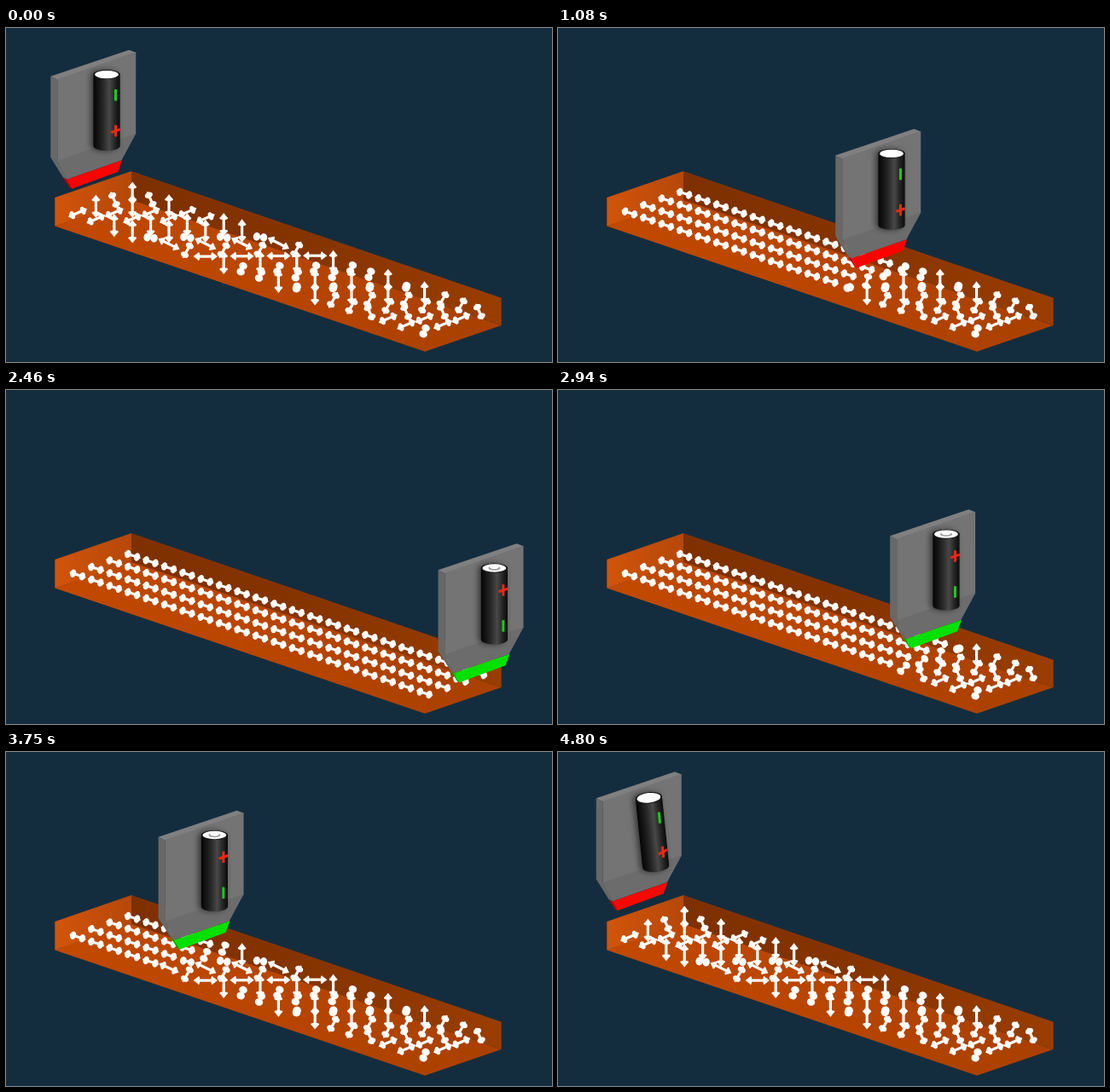
An HTML page with a canvas for the animation above (4830 ms loop, 640x392 px).

```html
<!DOCTYPE html>
<html lang="en">
<head>
<meta charset="utf-8">
<title>Magnetic head aligning dipoles</title>
<style>
html, body { margin: 0; width: 100%; height: 100%; overflow: hidden; background: #132d3f; }
canvas { display: block; }
</style>
</head>
<body>
<canvas id="stage" width="640" height="392"></canvas>
<script>
const ctx = document.getElementById('stage').getContext('2d');
const LOOP = 4830, STEP = 30, STEPS = 160;

// Half-vectors of the dipoles as seen on screen
const up = [0, -13], rise = [10.5, -4.5], fall = [12, 6], flat = [13.5, 0], steep = [5, -9],
  drop = [4, 9], stub = [2.5, -6], nub = [7, 1], dot = [.5, -2], aligned = [9.2, 3];

// Dipoles at the same height share one free pose
const poses = [up, drop, up, rise, rise, up, up, nub, fall, steep, flat, up,
  stub, stub, up, dot, up, steep, steep, drop, rise, rise, stub];

const clamp = v => Math.max(0, Math.min(1, v));
const mix = (a, b, k) => a + (b - a) * k;

// Distance from a turning point, rounded off within the given radius
const soften = (d, radius) => d < radius ? (d * d / radius + radius) / 2 : d;

// Constant speed to and fro with rounded turns
function headX(step) {
  const d = Math.abs((step - 70.1 + STEPS * 1.5) % STEPS - 80);
  return 287 + 7.8 * (d < 40 ? 40 - soften(d, 16.5) : soften(80 - d, 9.8) - 40);
}

function poly(fill, ...pts) {
  ctx.fillStyle = fill;
  ctx.beginPath();
  for (let i = 0; i < pts.length; i += 2) ctx.lineTo(pts[i], pts[i + 1]);
  ctx.closePath();
  ctx.fill();
}

function line(color, width, x1, y1, x2, y2) {
  ctx.strokeStyle = color;
  ctx.lineWidth = width;
  ctx.beginPath();
  ctx.moveTo(x1, y1);
  ctx.lineTo(x2, y2);
  ctx.stroke();
}

function oval(fill, x, y, rx, ry) {
  ctx.fillStyle = fill;
  ctx.beginPath();
  ctx.ellipse(x, y, rx, ry, 0, 0, 7);
  ctx.fill();
}

function gradient(x1, x2, ...colors) {
  const g = ctx.createLinearGradient(x1, 0, x2, 0);
  colors.forEach((c, i) => g.addColorStop(i / (colors.length - 1), c));
  return g;
}

function drawTray() {
  poly(gradient(58, 580, '#c24900', '#b84500', '#a84000'),
    57.3, 232.5, 147, 201, 580.7, 349, 491, 379.8);
  poly(gradient(147, 580, '#7e3000', '#863400', '#9a3d00'),
    147, 168, 580.7, 316.8, 580.7, 349, 147, 202);
  poly(gradient(58, 147, '#d2540a', '#b54809'),
    57.3, 199, 147, 168, 147, 202, 57.3, 232.5);
}

// Double cone arrow; shorter vectors point more towards the viewer
function drawDipole(x, y, vx, vy) {
  const len = Math.hypot(vx, vy), tilt = Math.sqrt(1 - Math.min(1, len / 14) ** 2);
  ctx.save();
  ctx.translate(x, y);
  ctx.rotate(Math.atan2(vy, vx));
  line('#fff', 3.2, -len * .6, 0, len * .6, 0);
  for (const side of [-1, 1]) {
    const base = side * len * .58;
    oval('#fff', base, 0, 4.8 * tilt, 4.8);
    poly('#fff', base, -4.8, side * len * 1.05, 0, base, 4.8);
  }
  ctx.restore();
}

function drawDipoles(x) {
  for (let row = 3; row >= 0; row--) {
    for (let col = 0; col < 20; col++) {
      const k = clamp(((x - 68) / 21.4 - col + .3) / 1.3);
      const [px, py] = poses[col - row + 3];
      drawDipole(84 + 21.4 * (col + row), 217 + 7.3 * col - 7.6 * row,
        mix(px, aligned[0], k), mix(py, aligned[1], k));
    }
  }
}

// Direction in the plane of the plate, as seen on screen
const inPlane = a => [-33 * Math.sin(a), -42 * Math.cos(a) + 11.5 * Math.sin(a)];

function drawBattery(turn) {
  const angle = turn * Math.PI, axis = inPlane(angle), across = inPlane(angle + Math.PI / 2);
  const facing = .35 * Math.cos(angle) + .65 * Math.sin(angle);
  const minusCap = facing >= 0, end = minusCap ? 1 : -1;
  const len = Math.hypot(...axis), r = 15.6, ry = r * Math.abs(facing);

  ctx.save();
  ctx.translate(112.8, 94.8);
  ctx.save();
  ctx.rotate(Math.atan2(axis[0] * end, -axis[1] * end));
  ctx.shadowColor = 'rgba(0,0,0,.55)';
  ctx.shadowBlur = 7;
  ctx.shadowOffsetX = -3;
  ctx.fillStyle = gradient(-r, r, '#050505', '#161616', '#2c2c2c', '#484848', '#262626', '#0a0a0a');
  ctx.beginPath();
  ctx.ellipse(0, len, r, ry, 0, 0, Math.PI);
  ctx.ellipse(0, -len, r, ry, 0, Math.PI, 2 * Math.PI);
  ctx.fill();
  ctx.shadowColor = 'transparent';
  oval('#181818', 0, -len, r, ry);
  oval('#fff', 0, -len, r - 1.8, ry * .86);
  if (!minusCap) {
    oval('#999', 0, -len, 7, ry * .5);
    oval('#fff', 0, -len - 1, 5.5, ry * .4);
  }
  ctx.restore();

  const mark = (color, at, v, half) => {
    const x = 10.5 + axis[0] * at, y = 4 + axis[1] * at;
    line(color, 3, x - v[0] * half, y - v[1] * half, x + v[0] * half, y + v[1] * half);
  };
  mark('#14d014', .52, axis, .16);
  mark('#f02810', -.48, axis, .16);
  mark('#f02810', -.48, across, .16);
  ctx.restore();
}

function drawHead(x, turn) {
  const tip = shade => `rgb(${mix(255, 0, turn) * shade},${mix(0, 225, turn) * shade},0)`;
  ctx.save();
  ctx.translate(x - 47, (x - 47) * .34);
  poly('#686868', 47, 55, 55, 59, 55, 154, 66, 176, 62, 174, 47, 150);
  poly('#808080', 47, 55, 139, 24, 147, 27, 55, 59);
  poly('#747474', 55, 58.5, 147, 26.5, 147, 122, 130, 153.5, 66, 175.5, 55, 154);
  poly('#6c6c6c', 55, 154, 147, 122, 130, 153.5, 66, 176);
  poly(tip(.75), 62, 174, 66, 176, 72, 187, 69, 185);
  poly(tip(1), 66, 176, 131, 153.5, 126, 167, 72, 187);
  drawBattery(turn);
  ctx.restore();
}

function draw() {
  const time = performance.now() % LOOP;
  const step = Math.max(0, Math.floor(time / STEP) - 1);
  const x = headX(step);
  const turn = clamp((step - 59.8) / 20) - clamp((step - 139.8) / 20);
  ctx.fillStyle = '#132d3f';
  ctx.fillRect(0, 0, 640, 392);
  drawTray();
  drawDipoles(x);
  drawHead(x, turn);
  requestAnimationFrame(draw);
}
draw();
</script>
</body>
</html>
```
